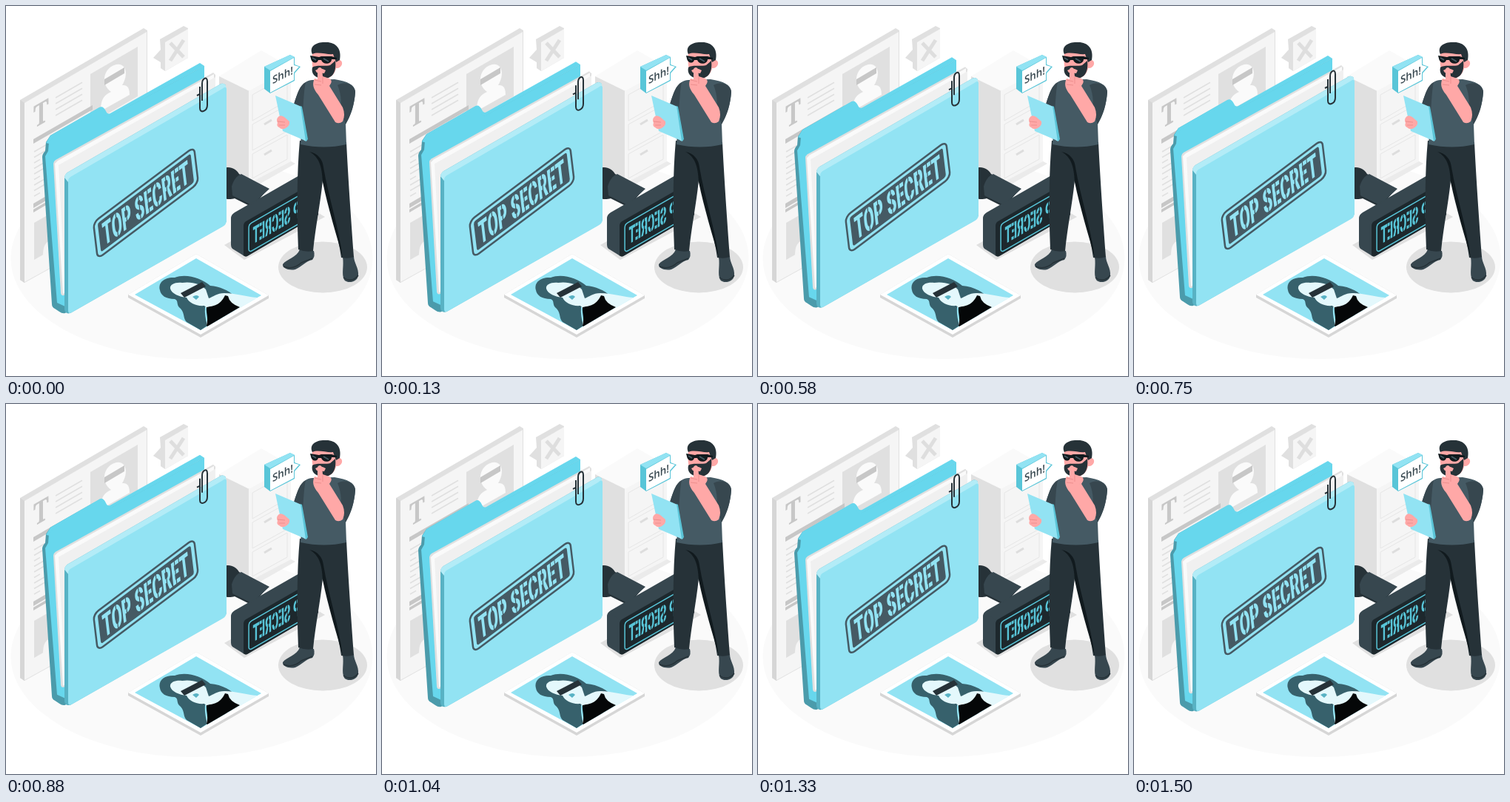
An HTML page that plays this animation: 500x500 px, repeating every 1540 ms.

```html
<!DOCTYPE html>
<html>
<head>
<meta charset="utf-8">
<style>
html, body { margin: 0; width: 100%; height: 100%; overflow: hidden; background: #fff }
svg { display: block; width: 100vw; height: 100vh }
.line { fill: none; vector-effect: non-scaling-stroke }
.ink { font: 900 42px Roboto, sans-serif; text-anchor: middle }
</style>
</head>
<body>
<svg viewBox="0 0 500 500">
<ellipse cx="251" cy="341" rx="244.500" ry="136" fill="#fafafa"/>

<g id="newspaper">
  <path d="M19 127L186 30 191 33V282L25 374 19 370Z" fill="#e0e0e0"/>
  <path d="M25 131L190 35V282L25 373Z" fill="#f5f5f5"/>
  <path d="M19 127L25 131V374L19 370Z" fill="#d6d6d6"/>
  <path d="M114 92L178 55V122L114 159Z" fill="#e0e0e0"/>
  <path d="M128 142C128 124 134 120 142 116 128 106 131 86 146 80 161 74 167 91 157 107 165 106 167 112 167 120Z" fill="#fafafa"/>
  <path d="M133 99L160 83V91L133 107Z" fill="#c7c7c7"/>
  <text transform="matrix(.76 -.44 0 1 37 166)" font-family="Noto Serif, serif" font-weight="bold" font-size="42" fill="#c7c7c7">T</text>
  <path id="rules" stroke="#e0e0e0" stroke-width="1.500"/>
  <path d="M37 180L117 134V140L37 186ZM37 267L66 250V256L37 273ZM37 275L66 258V262L37 279Z" fill="#c7c7c7"/>
  <path d="M38 293L75 272V322L38 343Z" fill="#e0e0e0"/>
  <path d="M50 337C50 323 54 318 64 315V329Z" fill="#f5f5f5"/>
</g>

<path d="M208 45L240 27 246 30V70L215 88 209 84V76L199 70 209 59Z" fill="#e0e0e0"/>
<path d="M215 49L246 31V70L215 88Z" fill="#f5f5f5"/>
<path d="M222 50L240 69M240 46L222 74" stroke="#dedede" stroke-width="5"/>

<g id="cabinet">
  <path d="M285 218L333 246 391 213 380 207Z" fill="#ebebeb"/>
  <path d="M288 95L345 60 387 84 333 117Z" fill="#fafafa"/>
  <path d="M288 95L333 117V240L288 214Z" fill="#e0e0e0"/>
  <path d="M328 115L385 84V210L328 240Z" fill="#f5f5f5"/>
  <path d="M333 120L380 94V128L333 155ZM333 160L380 134V169L333 195ZM333 200L380 174V207L333 233Z" fill="#f5f5f5" stroke="#e6e6e6"/>
  <path d="M349 160L359 154M349 201L359 195" stroke="#ddd" stroke-width="3"/>
</g>

<g id="stamper">
  <path d="M295 323L322 343 431 285 398 265Z" fill="#e0e0e0"/>
  <path d="M294 219C303 216 311 220 315 227L354 247 333 272 309 260C302 262 297 261 294 259Z" fill="#263238"/>
  <path d="M305 244C307 236 311 230 318 227L356 247 332 269 306 256Z" fill="#37474f"/>
  <path d="M304 287Q304 282 309 279L405 224 422 234V282L326 338Q322 339 319 336L306 328Q304 326 304 323Z" fill="#37474f"/>
  <path d="M306 283L405 225 422 235 326 290Q322 293 319 290Z" fill="#37474f"/>
  <path d="M321 297Q321 292 326 290L422 235V282L326 338Q321 340 321 334Z" fill="#1d282d"/>
  <g transform="matrix(-.33 .19 0 .76 420.500 242)">
    <rect class="line" width="280" height="50" rx="12" ry="6" stroke="#58c5d8" stroke-width="1.500"/>
    <text class="ink" x="140" y="39" fill="#58c5d8">TOP SECRET</text>
    <path class="cuts line" stroke="#1d282d"/>
  </g>
</g>

<g id="man">
  <ellipse cx="428" cy="353" rx="60" ry="34.500" fill="#e0e0e0"/>
  <path d="M397 329L416 331Q418 338 414 343C406 344 399 353 391 356 382 358 373 354 374 349 379 342 393 340 397 329Z" fill="#37474f"/>
  <path d="M455 339L470 338C470 347 477 354 476 364 475 373 462 376 457 370 453 362 457 351 455 339Z" fill="#37474f"/>
  <path d="M375 352Q388 357 399 347L414 341M456 367Q467 375 476 364" fill="none" stroke="#263238" stroke-width="1.500"/>
  <path d="M397 182L460 184C462 225 466 285 470 339Q463 342 453 340C449 308 437 274 428 236 424 272 418 300 415 331Q405 333 395 329C393 276 393 226 397 182Z" fill="#263238"/>
  <path d="M428 238C427 216 423 204 410 197 421 199 428 207 429 218 436 259 450 301 455 340 447 311 435 272 428 238Z" fill="#111a1e"/>
  <path d="M414 100C401 101 396 111 389 133L391 151 400 155 398 187Q430 194 460 187L459 159C467 147 471 131 472 116 471 106 462 102 444 99Z" fill="#455a64"/>
  <path d="M405 103C397 107 394 117 389 133L391 151 400 155C402 137 402 116 405 103ZM448 107C460 100 472 108 472 116 471 133 466 148 459 160L452 140C454 129 452 116 448 107Z" fill="#37474f"/>
  <path d="M414 62C413 75 413 90 422 96 435 102 444 94 446 84 454 85 457 75 451 73 445 72 449 63 446 60Z" fill="#ffa8a7"/>
  <path d="M414 65C409 54 420 48 433 49 446 49 454 58 451 73L446 76 442 65C434 66 421 61 414 65Z" fill="#263238"/>
  <path d="M414 83C419 79 430 82 438 80L445 74C447 91 440 98 429 98 417 98 412 91 414 83Z" fill="#263238"/>
  <path d="M418 87Q425 82 432 87L430 91 420 90Z" fill="#ffa8a7"/>
  <path d="M411 67L423 69 426 68 440 68 447 70V72L440 72C440 79 428 80 426 73L422 73C420 79 413 77 412 71Z" fill="#111a1e"/>
  <path d="M414 70L419 73M429 71L436 75" stroke="#455a64" stroke-width="2"/>
  <path d="M421 99V85Q424 81 427 85L428 95 437 98C442 101 439 105 437 108L455 137Q459 147 455 156 450 160 445 157L422 120C414 111 414 104 417 98Z" fill="#ffa8a7"/>
  <path d="M417 100L426 102M417 106L426 107M428 96L428 105" stroke="#ed8f8e" fill="none"/>
  <path d="M364 121L399 136 407 181Q406 184 402 181L374 169Z" fill="#92e3f3"/>
  <path d="M398 135L400 136 408 180 405 183Z" fill="#5bc4d7"/>
  <path d="M367 151Q370 146 376 150L383 156Q384 162 378 165 373 168 369 164 365 162 367 158 365 154 367 151Z" fill="#ffa8a7"/>
  <path d="M367 156L377 157M369 161L377 161" stroke="#ed8f8e"/>
</g>

<g id="bubble">
  <path d="M349 82L384 66 390 69V79L398 82 390 91V101L357 118 349 112Z" fill="#58c5d8"/>
  <path d="M349 82L384 66 390 69 357 87Z" fill="#92e3f3"/>
  <path d="M357 88L389 70V80L396 82 389 90V100L357 117Z" fill="#fff"/>
  <text transform="matrix(.92 -.46 0 1 360 105.500)" font-family="Open Sans, sans-serif" font-weight="600" font-size="14.500" fill="#37474f">Shh!</text>
</g>

<g id="folder">
  <path d="M49 204Q49 200 53 196L54 184 60 175 127 137 140 149 268 81V280L80 415Q76 416 72 413L66 409Q62 407 62 403Z" fill="#4b9bab"/>
  <path d="M53 203L57 196 58 184 63 177 127 140Q131 138 133 144 135 152 141 149L268 81V285L82 407 69 401Z" fill="#67d7ed"/>
  <path d="M54 185L60 175 126 137Q131 134 135 142 137 147 141 145L262 77 268 81 140 150Q135 152 132 145 131 139 126 142L63 178 58 186Z" fill="#67d7ed"/>
  <path d="M64 213Q64 210 67 208L280 90 283 93V270L78 391Q75 392 74 388Z" fill="#e0e0e0"/>
  <path d="M66 213L70 209 281 92V270L77 389Z" fill="#fafafa"/>
  <path d="M71 215L283 96V270L80 385Z" fill="#f0f0f0"/>
  <path d="M79 233Q79 228 83 225L289 106Q293 103 297 107L298 291 292 298 87 415Q80 417 79 410Z" fill="#58b2c4"/>
  <path d="M79 232Q79 228 83 225L289 106Q294 103 297 107L298 116 84 238Z" fill="#b3ecf7"/>
  <path d="M84 237Q84 233 87 231L292 112Q298 107 298 113V290Q298 295 293 298L89 414Q84 417 84 411Z" fill="#92e3f3"/>
  <g transform="matrix(.469 -.352 .12 1 118 292.500)">
    <rect class="line" width="290" height="49" rx="15" ry="7" stroke="#455a64" stroke-width="2.500"/>
    <rect x="11" y="5" width="268" height="39" rx="6" ry="3" fill="#455a64"/>
    <text class="ink" x="145" y="39.500" fill="#92e3f3">TOP SECRET</text>
    <path class="cuts line" stroke="#455a64" stroke-width="1.200"/>
  </g>
  <path d="M258 121L262 119M262 109V138C262 146 272 142 272 134V102C272 94 265 98 265 105V128" fill="none" stroke="#263238" stroke-width="2"/>
</g>

<g id="photo">
  <path d="M165 390L257 335 355 391V395L263 448 165 394Z" fill="#d6d6d6"/>
  <path d="M165 390L257 335 355 391 263 444Z" fill="#fff"/>
  <path d="M174 390L257 341 345 391 263 438Z" fill="#92e3f3"/>
  <path d="M208 384C205 373 215 366 228 367 244 361 264 368 276 378 289 379 300 384 309 392L285 400 269 407Q268 418 272 432L263 438 244 427C239 422 242 416 236 409 229 404 234 398 228 396 216 396 209 391 208 384Z" fill="#37616c"/>
  <path d="M222 382C221 376 229 373 238 374 251 372 264 376 270 383L274 395C280 393 285 388 295 388 312 388 328 394 340 394L316 408 271 432C272 420 274 409 268 405 257 406 247 401 244 394 234 393 224 389 222 382Z" fill="#e4f8fc"/>
  <path d="M236 388L265 373 270 379 241 394Z" fill="#263238"/>
  <path d="M252 393Q258 389 261 393L257 397Z" fill="#58b2c4"/>
  <path d="M271 432C274 421 270 415 271 407 281 405 289 405 296 391L300 392Q302 402 316 407L272 433Z" fill="#050708"/>
</g>
</svg>
<script>
const LOOP = 1540, FLOAT = 1500, STEP = 1000 / 24, RISE = 10;
const folder = document.getElementById("folder");

let rules = "";
const rule = (x, y, length) => rules += `M${x} ${y}l${length} ${-length * .577}`;
for (let i = 0; i < 4; i++) rule(67, 124 + i * 8, 36);
for (let i = 0; i < 9; i++) rule(38, 197 + i * 7.5, i % 3 == 2 ? 8 : 16);
document.getElementById("rules").setAttribute("d", rules);

// Stencil bridges through the middle of each letter.
for (const text of document.querySelectorAll(".ink")) {
  const cuts = [...text.textContent].map((letter, i) => {
    if (letter === " " || letter === "T") return "";
    const box = text.getExtentOfChar(i);
    return `M${box.x + box.width / 2} 7V42`;
  });
  text.nextElementSibling.setAttribute("d", cuts.join(""));
}

function draw(now) {
  const time = Math.floor((now % LOOP + 4) / STEP) * STEP;
  const lift = RISE * Math.max(0, 1 - Math.abs(2 * time / FLOAT - 1));
  folder.setAttribute("transform", `translate(0 ${-lift})`);
  requestAnimationFrame(draw);
}
draw(performance.now());
</script>
</body>
</html>
```
